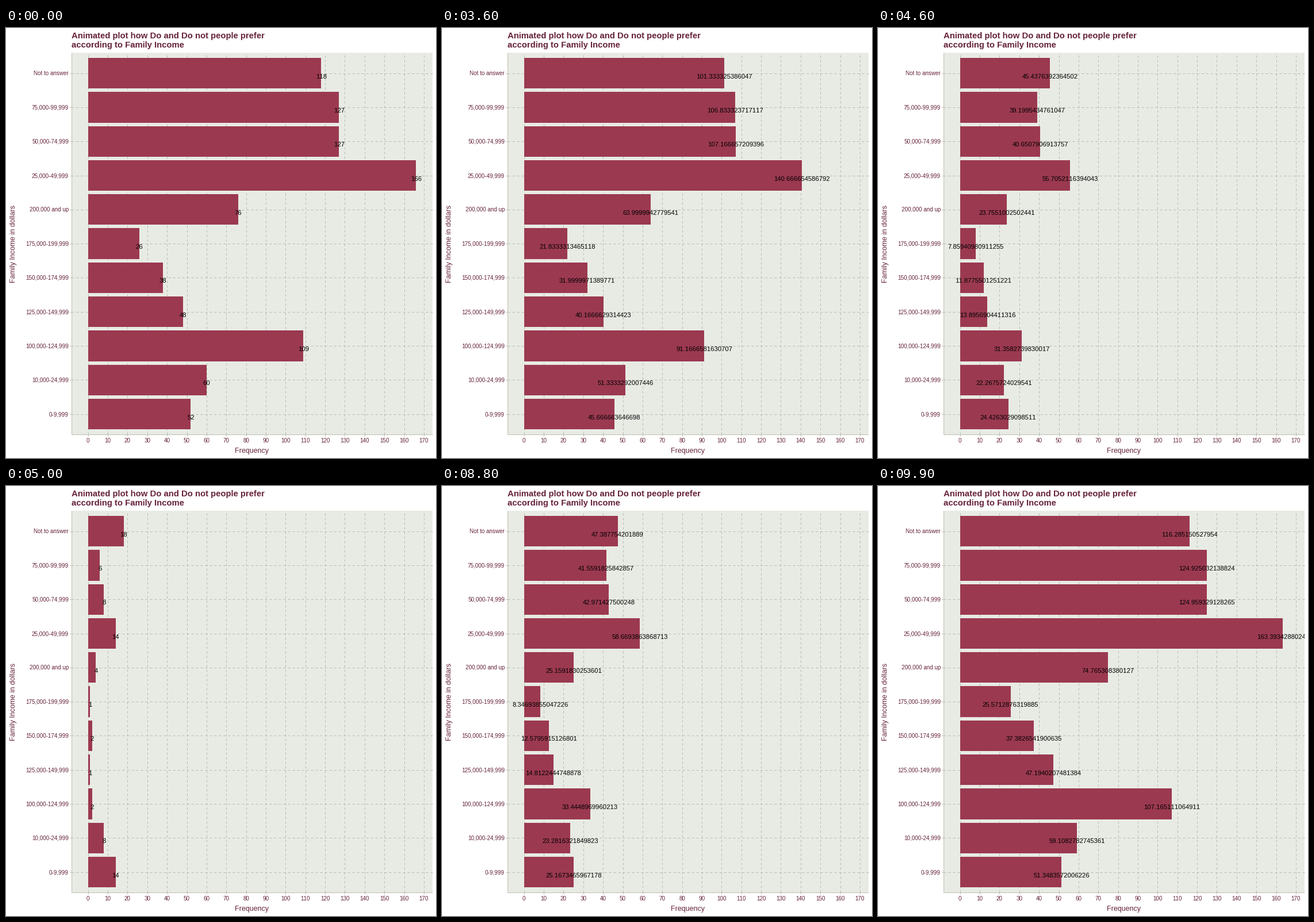
These frames come from a looping animation (748 px wide and 748 px high, 10 s). A matplotlib script:

```python
import numpy as np
import matplotlib.pyplot as plt
from matplotlib.animation import FuncAnimation
from matplotlib.patches import Rectangle

SIZE, DPI = 748, 64
LEFT, RIGHT, TOP, BOTTOM = 114.2, 741.7, 43.1, 707.1
SCALE = (RIGHT - LEFT) / 182.6
ZERO = LEFT + 8.3 * SCALE
ROW = (BOTTOM - TOP) / 11.2

PANEL, BAR, INK = "#e8ebe4", "#9b3950", "#66233b"
GRID, AXIS = "#b5baae", "#bfbfb0"

# category, first count, second count (top to bottom)
DATA = [
    ("Not to answer", 118, 18),
    ("75,000-99,999", 127, 6),
    ("50,000-74,999", 127, 8),
    ("25,000-49,999", 166, 14),
    ("200,000 and up", 76, 4),
    ("175,000-199,999", 26, 1),
    ("150,000-174,999", 38, 2),
    ("125,000-149,999", 48, 1),
    ("100,000-124,999", 109, 2),
    ("10,000-24,999", 60, 8),
    ("0-9,999", 52, 14),
]

HOLD, MOVE = 30, 20  # frames per state and per transition

plt.rcParams["font.family"] = ["Liberation Sans", "DejaVu Sans"]
plt.rcParams["text.kerning_factor"] = 6  # evenly spaced digits
fig = plt.figure(figsize=(SIZE / DPI, SIZE / DPI), dpi=DPI, facecolor="white")
ax = fig.add_axes([0, 0, 1, 1])
ax.set_xlim(0, SIZE)
ax.set_ylim(SIZE, 0)
ax.axis("off")


def pt(px):
    return px * 72 / DPI


def line(x0, y0, x1, y1, color, z, **kw):
    ax.plot([x0, x1], [y0, y1], color=color, lw=pt(1), zorder=z,
            solid_capstyle="butt", dash_capstyle="butt", **kw)


def label(x, y, s, px, color=INK, ha="center", **kw):
    return ax.text(x, y, s, fontsize=pt(px), color=color, ha=ha,
                   va="baseline", **kw)


def center(row):
    return TOP + (row + 0.6) * ROW


def bounce_out(p):
    if p < 4 / 11:
        return 121 * p * p / 16
    if p < 8 / 11:
        return 363 / 40 * p * p - 99 / 10 * p + 17 / 5
    if p < 9 / 10:
        return 4356 / 361 * p * p - 35442 / 1805 * p + 16061 / 1805
    return 54 / 5 * p * p - 513 / 25 * p + 268 / 25


def bounce_in(t):
    # single precision shows up in the printed decimals
    p = np.float32(1) - np.float32(t)
    return float(np.float32(1) - np.float32(bounce_out(float(p))))


panel = Rectangle((LEFT, TOP), RIGHT - LEFT, BOTTOM - TOP,
                  fc=PANEL, ec="none", zorder=0)
ax.add_patch(panel)

dash = (0, (4, 4))
for n in range(0, 171, 10):
    x = ZERO + n * SCALE
    line(x, BOTTOM, x, TOP, GRID, 1, ls=dash)
    line(x, BOTTOM, x, BOTTOM + 3, AXIS, 1)
    label(x, 721, str(n), 9.9)

bars, values = [], []
for i, (name, *_) in enumerate(DATA):
    y = center(i)
    line(LEFT, y, RIGHT, y, GRID, 1, ls=dash)
    line(LEFT - 3, y, LEFT, y, AXIS, 1)
    label(109, y + 3.6, name, 9.9, ha="right")

    y0, y1 = round(y - 0.45 * ROW), round(y + 0.45 * ROW)
    bar = Rectangle((round(ZERO), y0), 1, y1 - y0, fc=BAR, ec="none",
                    zorder=2, antialiased=False)
    bars.append(ax.add_patch(bar))
    text = label(ZERO, y + 9.1, "", 11.3, color="black", zorder=4)
    text.set_clip_path(panel)
    text.set_clip_on(True)
    values.append(text)

line(LEFT, TOP, LEFT, BOTTOM, AXIS, 3)
line(LEFT, BOTTOM, RIGHT, BOTTOM, AXIS, 3)

label(114, 18, "Animated plot how Do and Do not people prefer", 14.9,
      ha="left", weight="bold")
label(114, 34, "according to Family Income", 14.9, ha="left", weight="bold")
label((LEFT + RIGHT) / 2, 739, "Frequency", 12.45)
label(16.5, (TOP + BOTTOM) / 2, "Family Income in dollars", 12.5,
      rotation=90, rotation_mode="anchor")


def update(frame):
    half, k = divmod(frame, HOLD + MOVE)
    step = max(0, k - HOLD + 1)
    e = bounce_in(step / (MOVE + 1)) if step else 0.0
    for (_, *ends), bar, text in zip(DATA, bars, values):
        a, b = ends[half], ends[1 - half]
        v = a + (b - a) * e
        x = ZERO + v * SCALE
        bar.set_width(round(x) - round(ZERO))
        text.set_x(x)
        text.set_text(f"{v:.15g}")
    return bars + values


anim = FuncAnimation(fig, update, frames=2 * (HOLD + MOVE), interval=100,
                     repeat=True, repeat_delay=0, blit=False)
plt.show()
```
